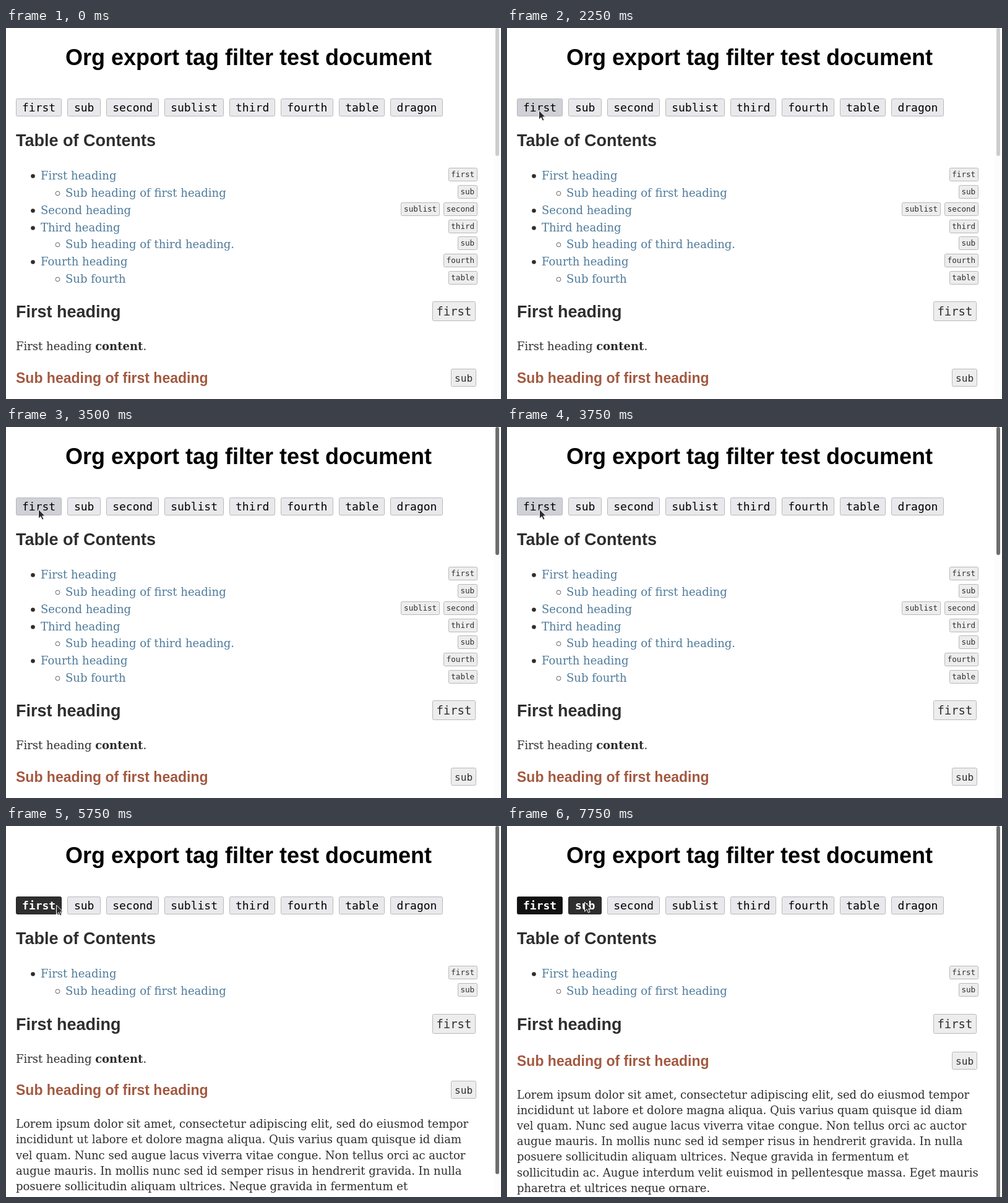
Write an HTML page that moves like this. It is 800 px wide and 600 px high and loops after 8000 ms.

```html
<!DOCTYPE html>
<html lang="en">
<head>
<meta charset="utf-8">
<title>Tag filter</title>
<style>
  html, body { margin: 0; width: 100%; height: 100%; overflow: hidden; background: #fff; }
  svg { display: block; width: 800px; height: 600px; }
  text { white-space: pre; }
  .serif { font: 18px "DejaVu Serif", serif; fill: #2e2e2e; }
  .sans { font-family: "Liberation Sans", Arial, sans-serif; font-weight: bold; fill: #2e2e2e; }
  .mono { font-family: "DejaVu Sans Mono", monospace; }
</style>
</head>
<body>
<svg id="stage" viewBox="0 0 800 600" xmlns="http://www.w3.org/2000/svg"></svg>
<script>
const STEP = 250, LOOP = 8000;
const INK = '#2e2e2e', LINK = '#4f7b9a', SIENNA = '#a35940', LINE = '#b9b9b9';
const MONO = 0.602; // advance width in em
const stage = document.getElementById('stage');

const buttonNames = ['first', 'sub', 'second', 'sublist', 'third', 'fourth', 'table', 'dragon'];
const toc = [
  ['First heading', 0, ['first']],
  ['Sub heading of first heading', 1, ['sub']],
  ['Second heading', 0, ['second', 'sublist']],
  ['Third heading', 0, ['third']],
  ['Sub heading of third heading.', 1, ['sub']],
  ['Fourth heading', 0, ['fourth']],
  ['Sub fourth', 1, ['table']]
];
const lorem = [
  'Lorem ipsum dolor sit amet, consectetur adipiscing elit, sed do eiusmod tempor',
  'incididunt ut labore et dolore magna aliqua. Quis varius quam quisque id diam',
  'vel quam. Nunc sed augue lacus viverra vitae congue. Non tellus orci ac auctor',
  'augue mauris. In mollis nunc sed id semper risus in hendrerit gravida. In nulla',
  'posuere sollicitudin aliquam ultrices. Neque gravida in fermentum et',
  'sollicitudin ac. Augue interdum velit euismod in pellentesque massa. Eget mauris',
  'pharetra et ultrices neque ornare.'
];
// Pointer tip: step, x, y
const path = [
  [1, 420, 4], [2, 262, 62], [3, 122, 112], [4, 66, 130], [5, 51.5, 133],
  [10, 51.5, 133], [15, 52.5, 133], [19, 56.5, 132], [22, 79.5, 129],
  [23, 81.5, 128], [24, 112.5, 125], [25, 126.5, 123], [28, 126.5, 123],
  [29, 125.5, 123], [32, 125.5, 123]
];

function add(parent, tag, attrs = {}, content) {
  const el = document.createElementNS('http://www.w3.org/2000/svg', tag);
  set(el, attrs);
  if (content) el.textContent = content;
  return parent.appendChild(el);
}
function set(el, attrs) {
  for (const k in attrs) el.setAttribute(k, attrs[k]);
}
const group = () => add(stage, 'g');
const sans = (g, x, y, size, str, fill = INK) =>
  add(g, 'text', { class: 'sans', x, y, style: `font-size:${size}px;fill:${fill}` }, str);
const serif = (g, x, y, str, fill = INK) =>
  add(g, 'text', { class: 'serif', x, y, style: `fill:${fill}` }, str);

function box(g, left, top, right, bottom, fill) {
  return add(g, 'rect', {
    x: left + 0.5, y: top + 0.5, width: right - left - 1, height: bottom - top - 1,
    rx: 2, fill, stroke: LINE
  });
}

// Tag label aligned by its right edge; returns its left edge
function label(g, right, top, height, size, base, str) {
  const left = right - str.length * size * MONO - size * 0.6 - 2;
  box(g, Math.round(left), top, Math.round(right), top + height, '#ededed');
  add(g, 'text', {
    class: 'mono', x: left + 1 + size * 0.3, y: base, 'font-size': size, fill: INK
  }, str);
  return left;
}

function tocRow([title, depth, tags], i) {
  const g = group(), x = 56 + depth * 40, y = Math.round(245.4 + 27.75 * i);
  add(g, 'circle', depth
    ? { cx: x - 12.5, cy: y - 5.5, r: 3.4, fill: 'none', stroke: '#6b625e' }
    : { cx: x - 12.5, cy: y - 5.5, r: 3.3, fill: INK });
  serif(g, x, y, title, LINK);
  let right = 762;
  for (const tag of tags) right = label(g, right, y - 19, 22, 12.6, y - 4, tag) - 6;
  return g;
}

function makeButtons() {
  let x = 16;
  return buttonNames.map(name => {
    const w = Math.max(54, name.length * 18 * MONO + 20);
    const left = Math.round(x), right = Math.round(x + w);
    const rect = box(stage, left, 114, right, 143, '#e9e9ed');
    const text = add(stage, 'text', {
      class: 'mono', x: x + w / 2, y: 135, 'font-size': 18, 'text-anchor': 'middle'
    }, name);
    x += w + 9;
    return { left, right, rect, text };
  });
}

sans(stage, 96, 60, 36, 'Org export tag filter test document', '#000');
const buttons = makeButtons();
sans(stage, 16, 191, 27, 'Table of Contents');
const rows = toc.map(tocRow);

const head = group();
sans(head, 16, 468, 27, 'First heading');
label(head, 759, 442, 32, 18.9, 465, 'first');

const intro = group();
serif(intro, 16, 521, 'First heading ');
const line = intro.firstChild;
line.textContent = 'First heading ';
add(line, 'tspan', { 'font-weight': 'bold' }, 'content');
add(line, 'tspan', {}, '.');

const sub = group();
sans(sub, 16, 574, 23, 'Sub heading of first heading', SIENNA);
label(sub, 760, 551, 29, 16.1, 572, 'sub');

const para = lorem.map(str => serif(stage, 16, 0, str));

add(stage, 'rect', { x: 788, width: 12, height: 600, fill: '#fcfcfc' });
const thumb = add(stage, 'rect', { x: 791, y: 0, width: 6, rx: 3 });

const pointer = add(stage, 'path', {
  d: 'M0 0V15.2L3.6 11.8 6 17.2 8.6 16 6.2 10.9H10.8Z',
  fill: '#2b2b2b', stroke: '#fff', 'stroke-linejoin': 'round'
});

function pointerAt(n) {
  const i = path.findIndex(p => p[0] > n);
  const [s0, x0, y0] = path[i - 1], [s1, x1, y1] = path[i];
  const k = (n - s0) / (s1 - s0);
  return [Math.floor(x0 + (x1 - x0) * k) + 0.5, Math.round(y0 + (y1 - y0) * k)];
}

function paintButton({ left, right, rect, text }, on, hover, pressed) {
  const fill = on ? (hover ? '#2e2e2e' : '#111')
    : hover ? (pressed ? '#b1b1b9' : '#d0d0d7') : '#e9e9ed';
  set(rect, { fill, stroke: on ? '#222' : LINE });
  set(text, { fill: on ? '#fff' : '#000', 'font-weight': on ? 'bold' : 'normal' });
}

const show = (el, on) => el.setAttribute('display', on ? 'inline' : 'none');
const shift = (el, dy) => el.setAttribute('transform', `translate(0 ${dy})`);

function draw(ms) {
  const n = Math.floor((ms % LOOP) / STEP);
  const first = (n >= 10 && n < 14) || n >= 23;
  const both = n >= 25;

  const [px, py] = n ? pointerAt(n) : [-50, -50];
  set(pointer, { transform: `translate(${px} ${py})` });
  buttons.forEach((b, i) => {
    const hover = px >= b.left && px < b.right && py >= 114 && py < 143;
    paintButton(b, i === 0 ? first : i === 1 && both, hover, n === 22);
  });

  rows.forEach((row, i) => show(row, i < 2 || !first));
  shift(head, first ? -138 : 0);
  shift(intro, -138);
  if (!first) shift(intro, 0);
  show(intro, !both);
  shift(sub, both ? -186 : first ? -139 : 0);
  const top = both ? 441.05 : 488.65;
  para.forEach((p, i) => {
    show(p, first);
    p.setAttribute('y', Math.floor(top + 25.2 * i));
  });

  set(thumb, {
    height: both ? 606 : first ? 563 : 207,
    fill: n >= 10 ? '#6e6e6e' : '#cdcdcd'
  });
}

const start = performance.now();
function tick() {
  draw(performance.now() - start);
  requestAnimationFrame(tick);
}
tick();
</script>
</body>
</html>
```
